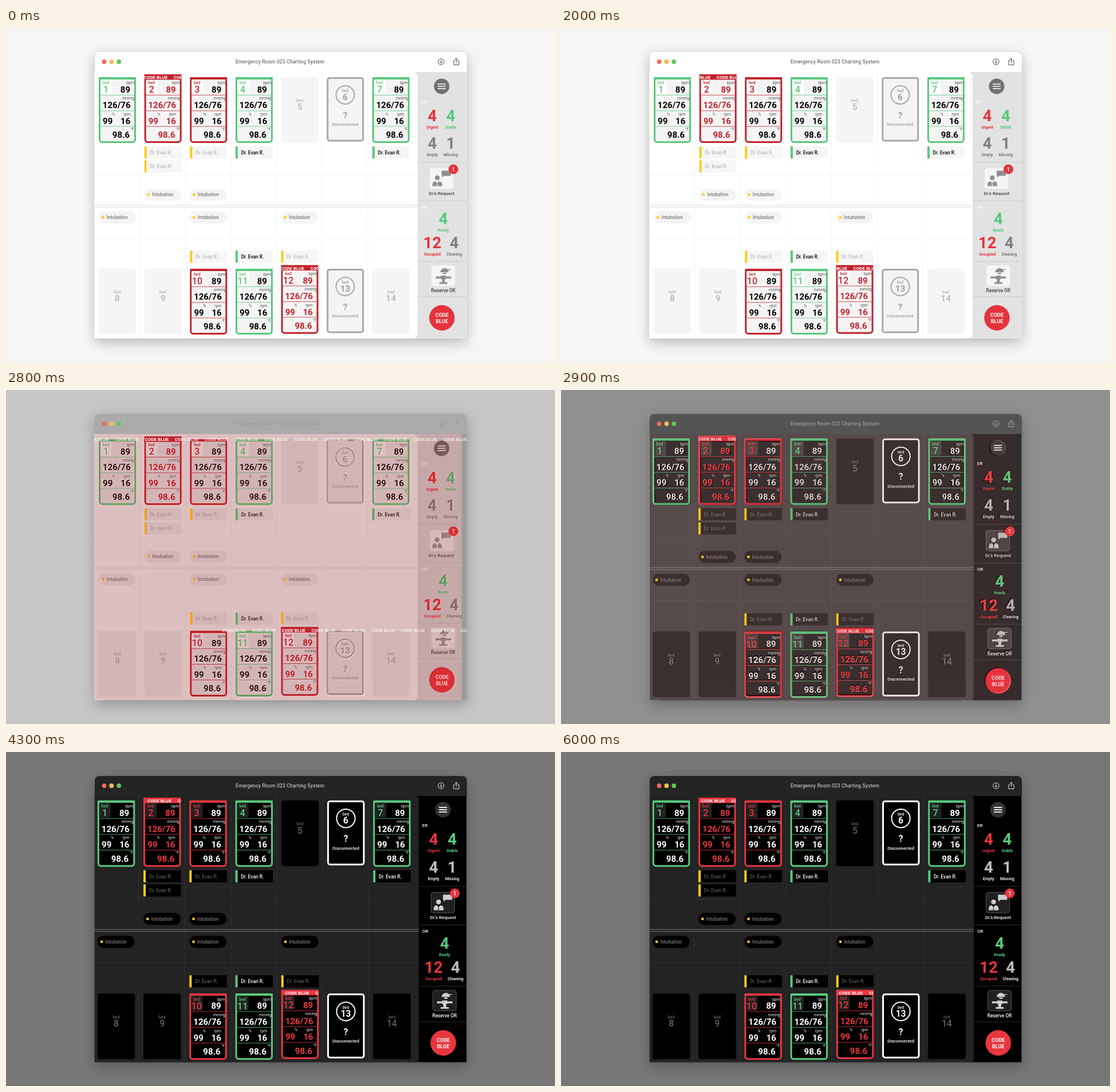
An HTML page that plays this animation: 959 px wide and 584 px high, repeating every 6100 ms.

```html
<!DOCTYPE html>
<html lang="en">
<head>
<meta charset="utf-8">
<title>Emergency room board</title>
<style>
  html, body { margin: 0; width: 959px; height: 584px; overflow: hidden; }
  #window {
    position: absolute; left: 154.5px; top: 42px; width: 650px; height: 500.5px;
    border-radius: 8px 8px 2px 2px;
    box-shadow: 0 7px 22px rgba(0, 0, 0, .25), 0 0 2px rgba(0, 0, 0, .12);
  }
  svg { position: absolute; left: 0; top: 0; display: block; }
  text { font-family: Roboto, sans-serif; white-space: pre; }
</style>
</head>
<body>
<div id="window"></div>
<svg id="stage" width="959" height="584" viewBox="0 0 959 584"></svg>
<script>
const LOOP = 6100, TICK = 100;
const PITCH = 79.65, LEFT = 162, CARD = 65, TOP = 86, LOWER = 335, REPEAT = 52.1;
const DOCTOR = "Dr. Evan R.";
const YELLOW = "#fbce1c";

const LIGHT = {
  panel: "#fff", side: "#e2e2e2", rule: "#c9c9c9", grid: "#f4f4f4", split: "#d9d9d9",
  card: "#f4f4f4", tile: "#fff", empty: "#f5f5f5", emptyInk: "#b5b5b5",
  off: "#a8a8a8", offFill: "#f4f4f4", offInk: "#a0a0a0",
  red: "#c2222c", green: "#58c87c", ink: "#000", unit: "#555",
  tag: "#f6f6f6", tagInk: "#ababab", pill: "#f4f4f4", pillInk: "#7c7c7c",
  menu: "#707070", head: "#fafafa", hot: "#e5333c", count: "#808080", label: "#777",
  caption: "#444", box: "#f5f5f5", boxLine: "#f5f5f5", icon: "#8f8f8f"
};
const DARK = {
  panel: "#232323", side: "#000", rule: "#2c2c2c", grid: "#303030", split: "#747474",
  card: "#000", tile: "#222", empty: "#000", emptyInk: "#626262",
  off: "#fff", offFill: "#000", offInk: "#fff",
  red: "#e8363f", green: "#58cb7e", ink: "#fff", unit: "#f0f0f0",
  tag: "#000", tagInk: "#6e6e6e", pill: "#000", pillInk: "#747474",
  menu: "#333", head: "#f5f5f5", hot: "#e8363f", count: "#bdbdbd", label: "#eee",
  caption: "#fff", box: "#202020", boxLine: "#666", icon: "#cfcfcf"
};

const rect = (x, y, w, h, fill, r = 0, extra = "") =>
  `<rect x="${x}" y="${y}" width="${w}" height="${h}" rx="${r}" fill="${fill}" ${extra}/>`;
const disc = (x, y, r, fill, extra = "") =>
  `<circle cx="${x}" cy="${y}" r="${r}" fill="${fill}" ${extra}/>`;
const path = (d, fill, extra = "") => `<path d="${d}" fill="${fill}" ${extra}/>`;
const line = (d, color, w = 1) => path(d, "none", `stroke="${color}" stroke-width="${w}"`);
const text = (x, y, s, size, fill, weight = 400, anchor = "middle", extra = "") =>
  `<text x="${x}" y="${y}" font-size="${size}" fill="${fill}" font-weight="${weight}" text-anchor="${anchor}" ${extra}>${s}</text>`;

const colX = i => LEFT + PITCH * i;

function ticker(x, y, count) {
  let s = "";
  for (let i = 0; i < count; i++) s += text(x + i * REPEAT, y, "CODE BLUE", 8, "#fff", 700, "start");
  return `<g class="ticker">${s}</g>`;
}

function strip(c, x, y, id) {
  return `<clipPath id="${id}">${rect(x, y, CARD, 9.5, "#000")}</clipPath>` +
    rect(x, y, CARD, 9.5, c.red) +
    `<g clip-path="url(#${id})">${ticker(x, y + 8, 3)}</g>`;
}

const strips = (c, id) =>
  strip(c, colX(1), 81, id + "a") + strip(c, colX(4) - .2, 414.5, id + "b");

function vitals(c, bed, col, y, color, alarm) {
  const x = colX(col), ink = alarm ? c.red : c.ink;
  const value = (dx, dy, s) => text(x + dx, y + dy, s, 15, ink, 700, "end");
  const unit = (dx, dy, s) => text(x + dx, y + dy, s, 6.9, c.unit, 400, "end");
  let s = rect(x + 1.5, y + 1.5, CARD - 3, 112, c.card, 4.5, `stroke="${color}" stroke-width="3"`);
  s += rect(x, y, CARD, 4, color, 1) + rect(x + 3, y + 4, 20, 25.5, c.tile, 2);
  for (const dy of [31.3, 58.8, 86]) s += line(`M${x + 3} ${y + dy}h${CARD - 6}`, color, .8);
  s += text(x + 12.6, y + 12.3, "bed", 6.9, color, 500) + text(x + 12.6, y + 27, bed, 16, color, 500);
  return s + unit(62, 12.3, "bpm") + value(55, 26.8, 89) +
    unit(62, 39, "mmHg") + value(55.5, 54.3, "126/76") +
    unit(28, 66.8, "%") + unit(55.3, 66.8, "rpm") + value(24.3, 81.8, 99) + value(55.3, 81.8, 16) +
    unit(61.5, 93, "°F") + value(54, 106.2, "98.6");
}

function emptyBed(c, bed, col, y) {
  const x = colX(col);
  return rect(x, y, CARD, 114, c.empty, 4) +
    text(x + 32.5, y + 43, "bed", 7.3, c.emptyInk, 500) + text(x + 32.5, y + 57.3, bed, 15.5, c.emptyInk, 500);
}

function offline(c, bed, col, y) {
  const x = colX(col), m = x + 32.3;
  return rect(x + 1.5, y + 1.5, CARD - 3, 109.5, c.offFill, 3.5, `stroke="${c.off}" stroke-width="3"`) +
    disc(m, y + 31, 16, "none", `stroke="${c.off}" stroke-width="2"`) +
    text(m, y + 26, "bed", 6.8, c.offInk, 500) + text(m, y + 40.2, bed, 15.5, c.offInk, 600) +
    text(m, y + 72, "?", 15.5, c.offInk, 700) + text(m, y + 85.3, "Disconnected", 7.6, c.offInk, 500);
}

function tag(c, col, y, ready) {
  const x = colX(col);
  return rect(x, y, CARD, 21, c.tag) + rect(x, y, 4, 21, ready ? c.green : YELLOW) +
    text(x + 9.7, y + 13.9, DOCTOR, 8.4, ready ? c.ink : c.tagInk, ready ? 500 : 400, "start");
}

function pill(c, col, y) {
  const x = colX(col);
  return rect(x, y, CARD - .5, 21, c.pill, 10.5) + disc(x + 7.2, y + 10.5, 2.4, YELLOW) +
    text(x + 13.5, y + 13.4, "Intubation", 8.2, c.pillInk, 500, "start");
}

function sidebar(c) {
  const stat = (x, y, n, name, color, nameColor = color, dy = 13) =>
    text(x, y, n, 27.5, color, 700) + text(x, y + dy, name, 6.9, nameColor, 700);
  let s = "";
  for (const y of [235, 302, 408, 470]) s += line(`M719 ${y}h90`, c.rule);
  s += disc(761, 102, 13.5, c.menu) + line("M754 98h14M754 102h14M754 106h14", "#fff", 1.7);
  s += text(725, 131.5, "ER", 8, c.head, 500, "start") + text(725, 315.5, "OR", 8, c.head, 500, "start");
  s += stat(744.7, 163, 4, "Urgent", c.hot) + stat(777, 163, 4, "Stable", c.green) +
    stat(744.7, 211, 4, "Empty", c.count, c.label) + stat(776.8, 211, 1, "Missing", c.count, c.label);
  s += stat(763.8, 343, 4, "Ready", c.green) + stat(744.8, 385.3, 12, "Occupied", c.hot) +
    stat(782.8, 385.3, 4, "Cleaning", c.count, c.label);

  const box = (x, y) => rect(x, y, 40.5, 35.5, c.box, 4, `stroke="${c.boxLine}" stroke-width=".8"`);
  s += box(740.5, 245.5) + disc(753.3, 262, 4.2, c.icon) +
    path("M745 276.5v-3q0-5 5-5.6l3.3 3.6 3.3-3.6q5.400.6 5.4 5.6v3z", c.icon) +
    path("M753.3 271l-1 4 1 1.500 1-1.500z", c.box) +
    path("M762 249.5h14q1 0 1 1v7q0 1-1 1h-10.500l-3.500 3v-3q-1 0-1-1v-7q0-1 1-1z", c.icon) +
    disc(781.5, 247, 8.5, c.hot) + text(781.5, 251, 1, 11, "#fff", 500) +
    text(761, 292, "Dr.’s Request", 8, c.caption, 500);
  s += box(743.5, 415.5) +
    path("M758.500 427q.500-6 7.500-7.200 6.500 1 7.500 7.200zM762 428h8q-1 2.500-4 2.500t-4-2.500z", c.icon) +
    line("M770 422.500h7", c.icon, 1.4) +
    path("M750.500 434.500h9v-1.500h9v1.500h9v3.500h-9l-2 2.500v4h4.500v3h-14v-3h4.500v-4l-2-2.500h-9z", c.icon) +
    text(763.7, 462, "Reserve OR", 8.2, c.caption, 500);
  return s + disc(761.5, 506.7, 22.2, c.hot) +
    text(761.5, 505.2, "CODE", 9, "#fff", 600) + text(761.5, 516, "BLUE", 9, "#fff", 600);
}

function board(c, id) {
  const low = TOP + LOWER;
  let s = rect(700, 70, 110, 480, c.side) + rect(140, 77, 579, 465.5, c.panel, 8) + rect(140, 70, 30, 480, c.panel);
  for (let i = 1; i < 7; i++) s += line(`M${colX(i) - 8} 77V309M${colX(i) - 8} 314V542`, c.grid);
  s += line("M150 257.5H719M150 367.5H719", c.grid) + line("M155 309.8H719M155 313.2H719", c.split);

  s += vitals(c, 1, 0, TOP, c.green) + vitals(c, 2, 1, TOP, c.red, true) +
    vitals(c, 3, 2, TOP, c.red) + vitals(c, 4, 3, TOP, c.green) +
    emptyBed(c, 5, 4, TOP) + offline(c, 6, 5, TOP) + vitals(c, 7, 6, TOP, c.green);
  s += emptyBed(c, 8, 0, low) + emptyBed(c, 9, 1, low) + vitals(c, 10, 2, low, c.red) +
    vitals(c, 11, 3, low, c.green) + vitals(c, 12, 4, low - 1.3, c.red, true) +
    offline(c, 13, 5, low) + emptyBed(c, 14, 6, low);
  s += strips(c, id);

  for (const [col, y, ready] of [[1, 207], [1, 231.5], [2, 207], [3, 207, 1], [6, 207, 1],
    [2, 389.3], [3, 389.3, 1], [4, 389.3]]) s += tag(c, col, y, ready);
  for (const [col, y] of [[1, 281], [2, 281], [0, 320.7], [2, 320.7], [4, 320.7]]) s += pill(c, col, y);
  return s + sidebar(c);
}

function titleBar() {
  const dots = ["#ed6a5e", "#f4be4f", "#61c554"];
  const icons = "M760 56v5.500M757.700 59.300l2.300 2.300 2.300-2.300" +
    "M784.500 57h-2.500v7.500h9v-7.500h-2.500M786.500 61v-8M784 55.300l2.500-2.500 2.500 2.500";
  return dots.map((f, i) => disc(171.5 + i * 12.85, 59, 3.9, f)).join("") +
    `<g id="title">${text(478.6, 62, "Emergency Room 023 Charting System", 8.6, "currentColor", 400, "middle", 'letter-spacing=".17"')}` +
    disc(760, 59, 5.2, "none", 'stroke="currentColor"') + line(icons, "currentColor") + "</g>";
}

const $ = id => document.getElementById(id);
$("stage").innerHTML =
  `<clipPath id="body">${rect(154.5, 77, 650, 465.5, "#000")}</clipPath>` + titleBar() +
  `<g clip-path="url(#body)">
    <g id="light">${board(LIGHT, "l")}</g>
    <g id="dark"><g transform="translate(450 245) scale(1.0075) translate(-450 -245)">${board(DARK, "d")}</g></g>
    <g id="flash">
      ${rect(154.5, 77, 641.5, 466, "#b41921", 0, 'id="tint"')}
      <g id="wide">
        ${rect(796, 77, 9, 466, "#8c8c8c", 0, 'opacity=".75"')}
        <g opacity=".75">${ticker(colX(1) - 2 * REPEAT, 89, 13)}${ticker(colX(4) - 2 * REPEAT, 422.5, 9)}</g>
        ${strips(LIGHT, "w")}
      </g>
    </g>
  </g>`;
const tickers = document.querySelectorAll(".ticker");

// start, page grey, bar grey, title grey, dark opacity, red opacity, wide ticker
const STEPS = [
  [0, 246, 255, 72, 0, 0, 0],
  [2700, 235, 228, 82, 0, 0, 0],
  [2800, 198, 170, 156, .1, .2, 1],
  [2900, 144, 84, 170, .8, .08, 0],
  [3000, 119, 36, 228, 1, 0, 0]
];
const grey = v => `rgb(${v},${v},${v})`;

function tickerShift(t) {
  const s = t / 1000;
  const x = s <= 2.8 ? -1 - 36.5 * s : -3.5 - (s < 3 ? 22 : 32) * (s - 3);
  return ((x + 5) % REPEAT + REPEAT) % REPEAT - 5 - (x + 5 < 0 ? 0 : 0);
}

function draw(now) {
  const t = Math.floor(now % LOOP / TICK) * TICK;
  const [, page, bar, ink, dark, red, wide] = STEPS.filter(s => s[0] <= t).pop();
  document.body.style.background = grey(page);
  $("window").style.background = grey(bar);
  $("title").style.color = grey(ink);
  $("dark").style.opacity = dark;
  $("tint").style.opacity = red;
  $("wide").style.display = wide ? "" : "none";
  let x = tickerShift(t);
  if (x > 10) x -= REPEAT;
  for (const g of tickers) g.setAttribute("transform", `translate(${x} 0)`);
}

const start = performance.now();
function frame() {
  draw(performance.now() - start);
  requestAnimationFrame(frame);
}
frame();
</script>
</body>
</html>
```
